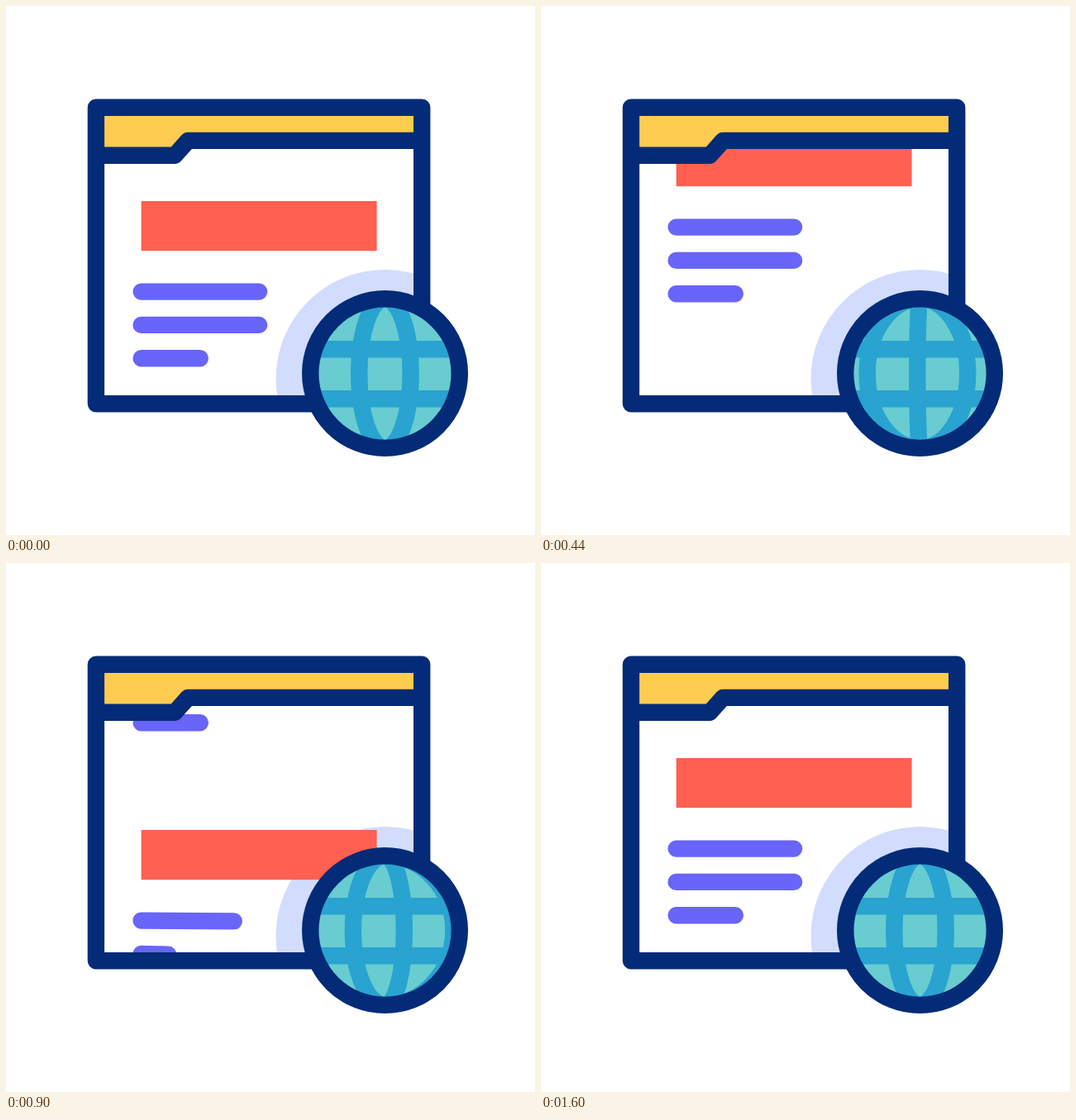
These frames come from a looping animation (640x640 px, 1.62 s). An HTML page:

```html
<!DOCTYPE html>
<html lang="en">
<head>
<meta charset="utf-8">
<title>Scrolling web page</title>
<style>
  :root {
    --loop: 1620ms;
    --navy: #032b77;
    --sea: #29a3d0;
    /* half ellipses from pole to pole, east to west */
    --far-east: path("M0 -90.3C49.9 -90.3 90.3 -49.9 90.3 0S49.9 90.3 0 90.3");
    --east: path("M0 -90.3C17.2 -90.3 31.2 -49.9 31.2 0S17.2 90.3 0 90.3");
    --west: path("M0 -90.3C-17.2 -90.3 -31.2 -49.9 -31.2 0S-17.2 90.3 0 90.3");
    --far-west: path("M0 -90.3C-49.9 -90.3 -90.3 -49.9 -90.3 0S-49.9 90.3 0 90.3");
    --dot: path("M0 0L.1 .8");
    --long: path("M0 0L142.5 0");
    --short: path("M0 0L71.2 0");
  }
  html, body { margin: 0; width: 100%; height: 100%; overflow: hidden; background: #fff; }
  svg { display: block; width: 100vw; height: 100vh; }

  .frame { fill: none; stroke: var(--navy); stroke-width: 20.4; stroke-linejoin: round; }
  .banner { fill: #ff6050; }
  .line { fill: none; stroke: #6865f8; stroke-width: 20.4; stroke-linecap: round; }
  .grid { fill: none; stroke: var(--sea); stroke-width: 20.4; }

  .long { d: var(--long); --full: var(--long); --peak: path("M0 0L207.5 .8"); }
  .short { d: var(--short); --full: var(--short); --peak: path("M0 0L83 .8"); }

  .scroll { animation: scroll var(--loop) infinite; }
  .next .banner { animation: unfold var(--loop) infinite; }
  .next .line { animation: grow var(--loop) var(--wait, 0ms) infinite; }
  .meridian { animation: spin var(--loop) linear infinite; }
  .scroll, .next .banner, .next .line { animation-timing-function: cubic-bezier(.3333, 0, .6667, 1); }

  @keyframes scroll {
    0% { transform: translateY(0); }
    84.6%, 100% { transform: translateY(-320px); }
  }
  @keyframes unfold {
    0%, 25.3% { width: 0; }
    51%, 100% { width: 285px; }
  }
  @keyframes grow {
    0%, 41.5% { d: var(--dot); }
    68.3% { d: var(--peak); }
    79.6%, 100% { d: var(--full); }
  }
  /* each meridian slides to its neighbour's place, twice per loop */
  @keyframes spin {
    0%, 49.384% { d: var(--from); }
    49.383%, 98.765%, 100% { d: var(--to); }
  }
</style>
</head>
<body>
<svg viewBox="0 0 640 640">
  <defs>
    <clipPath id="page"><rect x="109" y="123" width="394" height="358"/></clipPath>
    <clipPath id="ball"><circle r="85"/></clipPath>
  </defs>

  <g clip-path="url(#page)">
    <circle cx="458.5" cy="451" r="132" fill="#d2dcfd"/>
    <g class="scroll">
      <g transform="translate(163.6 236)">
        <rect class="banner" width="285" height="60.2"/>
        <path class="line" d="M0 109.6H142.5M0 149.9H142.5M0 190.2H71.2"/>
      </g>
      <g class="next" transform="translate(163.6 556)">
        <rect class="banner" width="285" height="60.2"/>
        <path class="line long" transform="translate(0 109.6)"/>
        <path class="line long" transform="translate(0 149.9)" style="--wait:120ms"/>
        <path class="line short" transform="translate(0 190.2)" style="--wait:220ms"/>
      </g>
    </g>
  </g>

  <path d="M109 123H503V163H220L204 181H109Z" fill="#fdcc51"/>
  <path class="frame" d="M109 180.8H204.2L220.2 162.9H503"/>
  <rect class="frame" x="108.9" y="122.7" width="394.3" height="358.5"/>

  <g transform="translate(458.5 444.6)">
    <circle r="90" fill="#68ccd1"/>
    <g class="grid" clip-path="url(#ball)">
      <path d="M-90 -29.4H90M-90 30.6H90"/>
      <path class="meridian" style="--from:var(--far-east);--to:var(--east)"/>
      <path class="meridian" style="--from:var(--east);--to:var(--west)"/>
      <path class="meridian" style="--from:var(--west);--to:var(--far-west)"/>
    </g>
    <circle class="frame" r="90.3"/>
  </g>
</svg>
</body>
</html>
```
